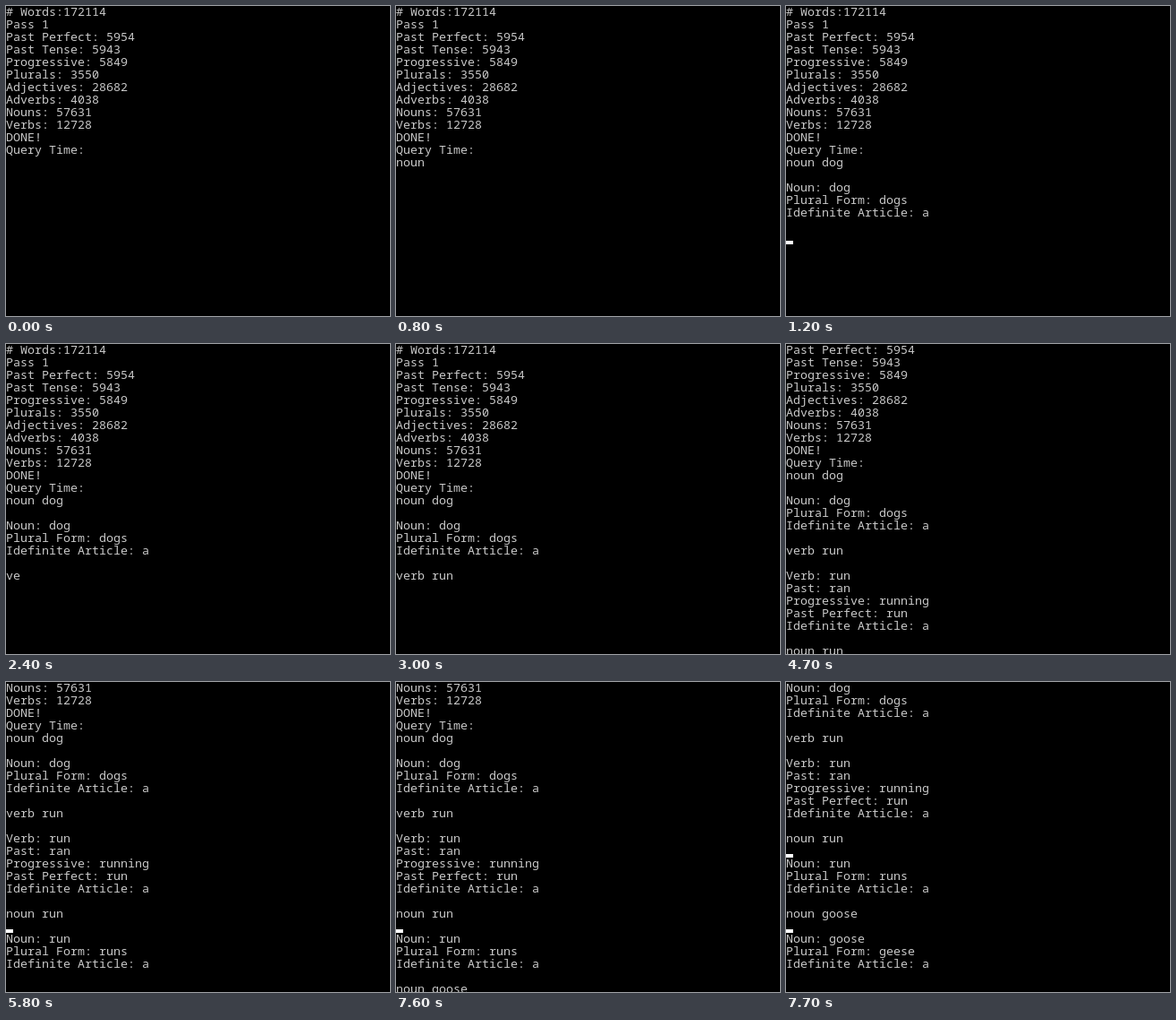
These frames come from a looping animation (429 px wide and 346 px high, 8000 ms). An HTML page:

```html
<!DOCTYPE html>
<html lang="en">
<head>
<meta charset="utf-8">
<title>Word query console</title>
<style>
  html, body { margin: 0; width: 100%; height: 100%; overflow: hidden; background: #000; }
  svg { display: block; }
  text { font: 13.333px "Noto Sans Mono", "DejaVu Sans Mono", monospace; fill: #c8c8c8; white-space: pre; }
  rect { fill: #fff; }
</style>
</head>
<body>
<svg id="screen" width="429" height="346"></svg>
<script>
const LOOP = 8000, ROW = 14, COL = 8, ROWS = 25;
const screen = document.getElementById('screen');

const header = [
  '# Words:172114', 'Pass 1', 'Past Perfect: 5954', 'Past Tense: 5943',
  'Progressive: 5849', 'Plurals: 3550', 'Adjectives: 28682', 'Adverbs: 4038',
  'Nouns: 57631', 'Verbs: 12728', 'DONE!', 'Query Time:'
];
const noun = (word, plural) =>
  ['Noun: ' + word, 'Plural Form: ' + plural, 'Idefinite Article: a'];

// row: buffer line of the query; keys: time of each character;
// done: time of the answer; top: first visible line after it
const queries = [
  { row: 12, text: 'noun dog', keys: [500, 600, 700, 800, 900, 900, 1000, 1100],
    done: 1200, top: 0, answer: noun('dog', 'dogs') },
  { row: 18, text: 'verb run', keys: [2300, 2400, 2500, 2600, 2700, 2800, 2900, 3000],
    done: 3300, top: 2, answer: ['Verb: run', 'Past: ran', 'Progressive: running',
      'Past Perfect: run', 'Idefinite Article: a'] },
  { row: 26, text: 'noun run', keys: [4000, 4100, 4200, 4400, 4400, 4600, 4700, 4700],
    done: 5800, top: 8, answer: noun('run', 'runs') },
  { row: 32, text: 'noun goose',
    keys: [6700, 6900, 6900, 7100, 7100, 7200, 7300, 7400, 7500, 7600],
    done: 7700, top: 14, answer: noun('goose', 'geese') }
];

const typed = (query, t) => query.keys.filter(key => key <= t).length;

// [line, from, to, column]
const cursors = [
  [18, 1200, 2000, () => 0],
  [18, 2500, 3000, t => typed(queries[1], t)],
  [27, 5800, LOOP, () => 0],
  [33, 7700, LOOP, () => 0]
];

function add(tag, attrs) {
  const el = document.createElementNS('http://www.w3.org/2000/svg', tag);
  for (const name in attrs) el.setAttribute(name, attrs[name]);
  return screen.appendChild(el);
}

const rows = Array.from({ length: ROWS }, (_, i) => add('text', { x: 0, y: i * ROW + 11 }));
const marks = cursors.map(() => add('rect', { width: COL, height: 4 }));

function draw(t) {
  const lines = header.slice();
  let top = 0;
  for (const q of queries) {
    lines[q.row] = q.text.slice(0, typed(q, t));
    if (t < q.done) continue;
    top = q.top;
    q.answer.forEach((line, i) => lines[q.row + 2 + i] = line);
  }
  rows.forEach((el, i) => {
    const line = lines[top + i] || '';
    if (el.textContent !== line) el.textContent = line;
  });
  cursors.forEach(([line, from, to, column], i) => {
    marks[i].setAttribute('x', column(t) * COL);
    marks[i].setAttribute('y', (line - top) * ROW + 10);
    marks[i].setAttribute('visibility', t >= from && t < to ? 'visible' : 'hidden');
  });
}

const start = performance.now();
function tick() {
  draw((performance.now() - start) % LOOP);
  requestAnimationFrame(tick);
}
tick();
</script>
</body>
</html>
```
